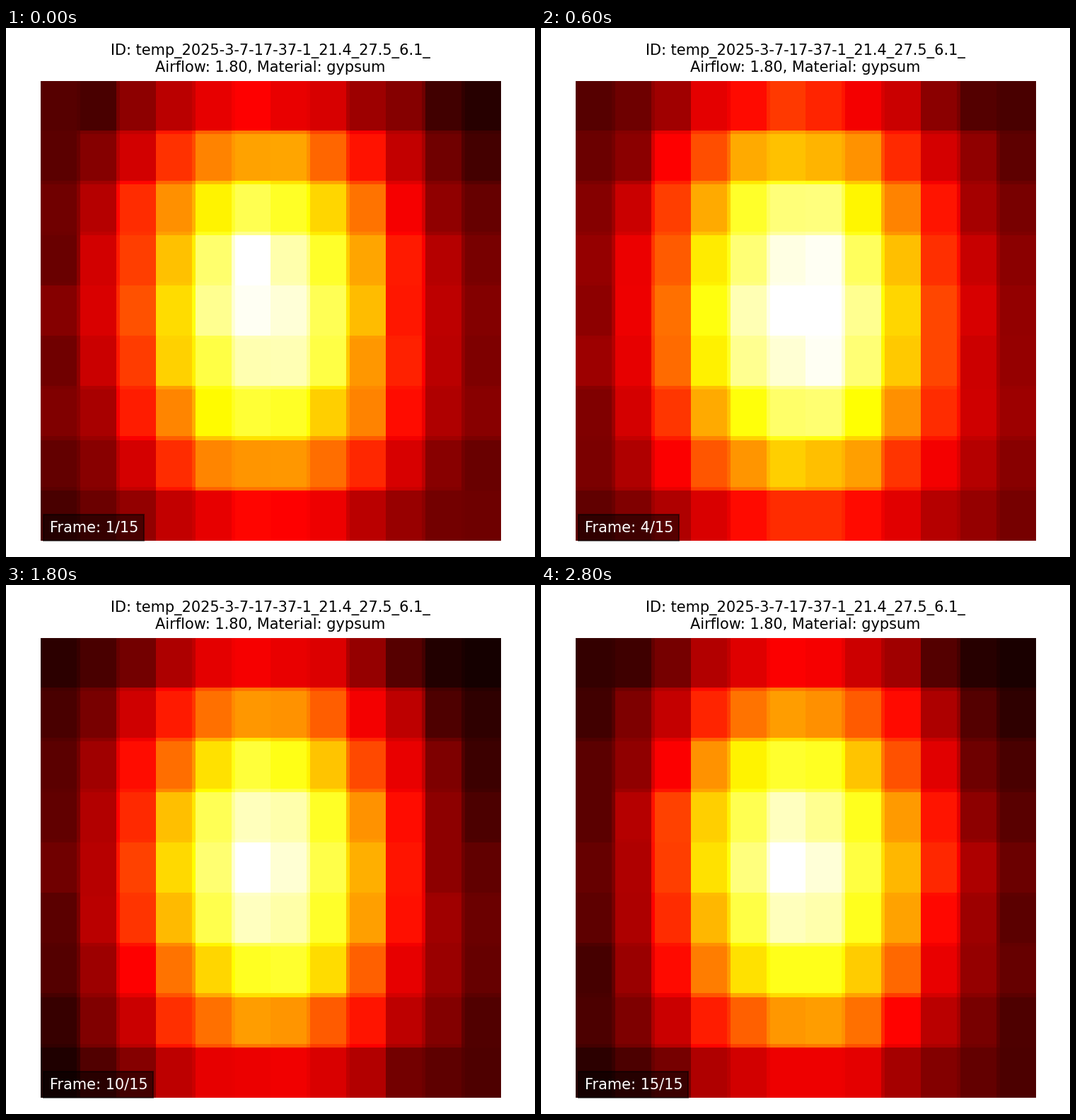
These frames come from a looping animation (748x748 px, 3000 ms). A matplotlib script:

```python
import numpy as np
import matplotlib.pyplot as plt
from matplotlib.animation import FuncAnimation

SIZE, FRAMES, STEP = 748, 15, 200
ROWS, COLS, RES = 9, 12, 128
LEFT, TOP, SIDE = 48.5, 74.5, 651
FONT = 15

Y, X = np.mgrid[:ROWS, :COLS]
NOISE = np.random.default_rng(3).normal(0, .012, (FRAMES, ROWS, COLS))


def plume():
    """Steady heat: a cosine arch down the rows, squared across the columns."""
    arch = np.cos(np.pi * (Y - 3.9) / ROWS)
    across = np.cos(np.pi * (X - 5.35) / COLS) ** 2
    floor = .02 + .09 * arch + .007 * Y
    skew = .001 * (Y - 3) * (X - 5.5)
    return floor + (.2 + .65 * arch) * across + skew


def drift(step):
    """An early warm pulse, with side edges that cool down over time."""
    pulse = .065 * np.exp(-((step - 3) / 2.5) ** 2) - .02
    edge = ((X - 5.5) / 5.5) ** 2
    return pulse + .03 * np.exp(-step / 3) * edge


def hot_spot(step):
    """The hottest point wanders down and right, then settles."""
    x = np.interp(step, [0, 1, 5, 7], [5, 6, 6, 5])
    y = np.interp(step, [0, 1, 5, 7], [3, 4.3, 4.3, 4])
    return .08 * np.exp(-((X - x) ** 2 + (Y - y) ** 2) / .36)


def heat(step):
    return np.clip(plume() + drift(step) + hot_spot(step) + NOISE[step], 0, 1)


def enlarge(field):
    """Area resampling to RES x RES; cells blend where they share a pixel."""
    tall = np.repeat(field, RES, axis=0).reshape(RES, ROWS, COLS).mean(axis=1)
    return np.repeat(tall, RES, axis=1).reshape(RES, RES, COLS).mean(axis=2)


plt.rcParams["font.family"] = "DejaVu Sans"
fig = plt.figure(figsize=(SIZE / 100, SIZE / 100), dpi=100, facecolor="white")
ax = fig.add_axes([LEFT / SIZE, 1 - (TOP + SIDE) / SIZE, SIDE / SIZE, SIDE / SIZE])
ax.axis("off")
ax.set_title("ID: temp_2025-3-7-17-37-1_21.4_27.5_6.1_\n"
             "Airflow: 1.80, Material: gypsum", fontsize=FONT, pad=9)
image = ax.imshow(enlarge(heat(0)), cmap="hot", vmin=0, vmax=1,
                  interpolation="nearest", aspect="auto")
label = ax.text(.02, .02, "", transform=ax.transAxes, color="white", fontsize=FONT,
                bbox=dict(facecolor="black", alpha=.5, pad=6, linewidth=1.5))


def update(step):
    image.set_data(enlarge(heat(step)))
    label.set_text(f"Frame: {step + 1}/{FRAMES}")
    return image, label


anim = FuncAnimation(fig, update, frames=FRAMES, interval=STEP,
                     repeat=True, repeat_delay=0)
plt.show()
```
